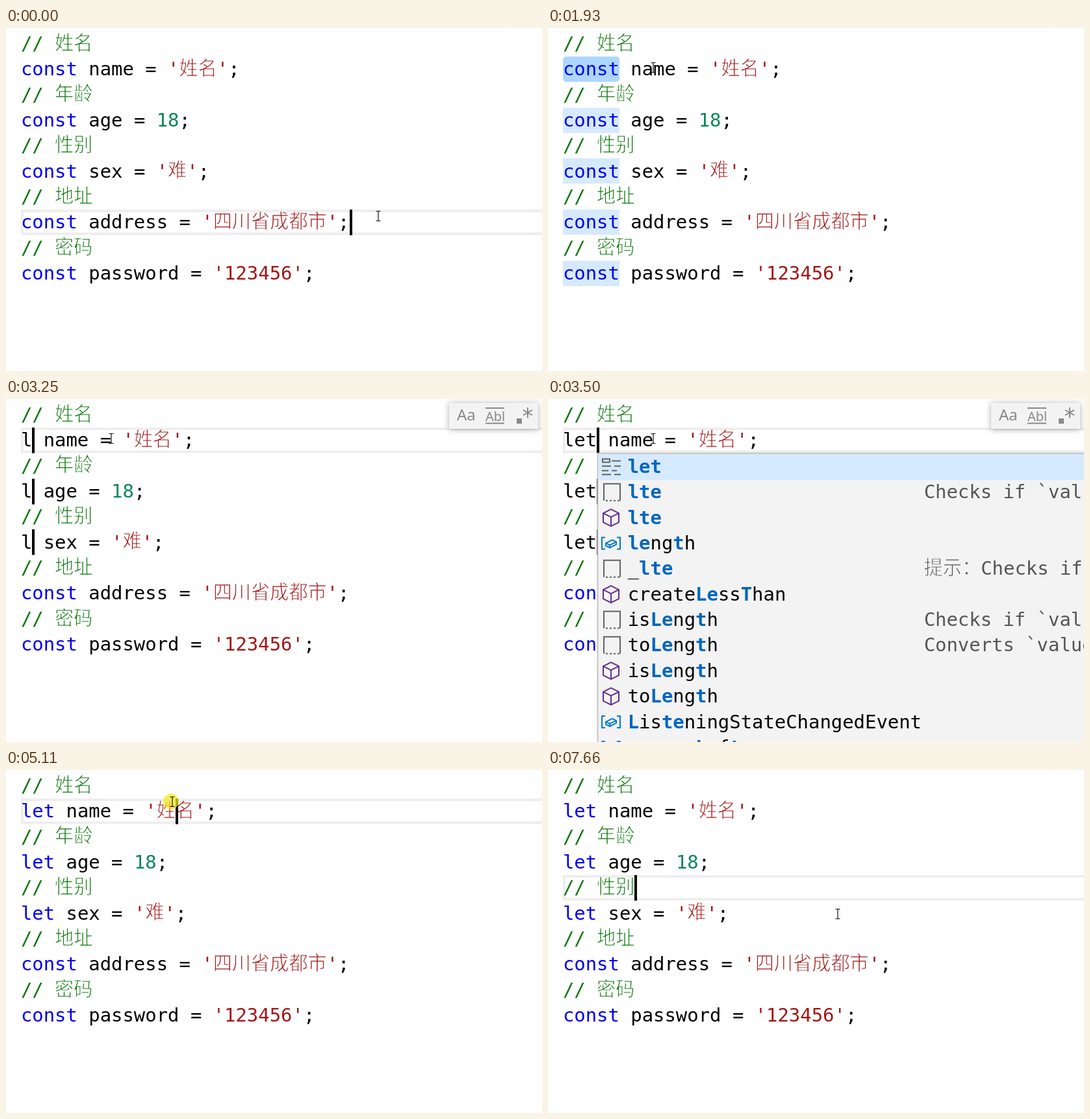
Write an HTML page that moves like this. It is 825 by 529 pixels and loops after 7980 ms.

```html
<!DOCTYPE html>
<html lang="zh-CN">
<head>
<meta charset="utf-8">
<title>Multi-cursor editing</title>
<style>
html, body { margin: 0; width: 100%; height: 100%; overflow: hidden; background: #fff; }
svg { display: block; width: 100vw; height: 100vh; }
text { font: 28.9px "DejaVu Sans Mono", monospace; white-space: pre; }
/* A background-coloured outline thins the Chinese strokes. */
.cjk { font: 200 29.2px "Noto Sans CJK SC", "Noto Sans CJK", sans-serif; stroke: #fff; stroke-width: .9; }
.menu .cjk { stroke: #f3f3f3; }
.hit { font-weight: bold; fill: #0066bf; }
.ui { font: 25px "Noto Sans", "Open Sans", sans-serif; fill: #888; }
.icon { fill: none; stroke-width: 2; }
</style>
</head>
<body>
<svg id="stage" viewBox="0 0 825 529" xmlns="http://www.w3.org/2000/svg">
  <g id="scene"></g>
  <g id="mouse">
    <circle id="halo" cx="-2" cy="-.5" r="12" fill="#f6ec1c" fill-opacity=".72"/>
    <path d="M-3.5-7.5h3l.5 1 .5-1h3M0-7v14M-3.5 7.5h3l.5-1 .5 1h3" fill="none" stroke="#111" stroke-width="1.2"/>
  </g>
</svg>
<script>
const LOOP = 7980;
const LEFT = 22.9, TOP = 4.7, ROW = 39.35, LATIN = 17.4, WIDE = 29.17;
const INK = { comment: '#087608', key: '#0000f0', string: '#a31515', number: '#098658', plain: '#000' };
const $ = id => document.getElementById(id);
const isWide = c => c > '\u2e7f';
const width = s => [...s].reduce((w, c) => w + (isWide(c) ? WIDE : LATIN), 0);
const rowTop = i => Math.round(TOP + ROW * i);
const within = (t, a, b) => t >= a && t < b;
const rect = (x, y, w, h, fill, more = '') =>
  `<rect x="${x}" y="${y}" width="${w}" height="${h}" fill="${fill}" ${more}/>`;

// Latin and Chinese characters have different advances, so each run is placed by itself.
function runs(s, x, y, fill, cls = '') {
  let out = '';
  for (const run of s.match(/[\u2e80-\uffff]+|[^\u2e80-\uffff]+/g) || []) {
    const wide = isWide(run[0]);
    out += `<text x="${x.toFixed(2)}" y="${(wide ? y - 1.3 : y).toFixed(2)}" fill="${fill}" class="${wide ? 'cjk' : cls}">${run}</text>`;
    x += width(run);
  }
  return out;
}

function codeLine(s, row, plainKeys) {
  let x = LEFT, out = '';
  const tokens = s.match(/\/\/.*|'[^']*'|\b\d+\b|\b(?:const|let)\b|\w+|[^\w']+/g);
  for (const tok of tokens) {
    const kind = tok.startsWith('//') ? 'comment'
      : tok[0] === "'" ? 'string'
      : /^\d/.test(tok) ? 'number'
      : /^(const|let)$/.test(tok) && !(plainKeys && tok === 'let') ? 'key' : 'plain';
    out += runs(tok, x, TOP + ROW * row + 29.3, INK[kind]);
    x += width(tok);
  }
  return out;
}

function code(t) {
  const word = t < 3250 ? 'const' : t < 3400 ? 'l' : t < 3500 ? 'le' : 'let';
  return [
    '// 姓名', word + " name = '姓名';",
    '// 年龄', word + ' age = 18;',
    '// 性别', word + " sex = '难';",
    '// 地址', "const address = '四川省成都市';",
    '// 密码', "const password = '123456';"
  ].map((s, i) => codeLine(s, i, t < 3570)).join('');
}

function activeLine(t) {
  if (within(t, 1440, 3250)) return '';
  const row = t < 1300 ? 7 : t < 5740 ? 1 : 4;
  return rect(25, rowTop(row) + 2, 830, ROW - 4, 'none', 'stroke="#eee" stroke-width="4"');
}

function selection(t) {
  if (!within(t, 1440, 3250)) return '';
  const since = [1440, 2090, 2470];
  return [1, 3, 5, 7, 9].map((row, i) => {
    const box = (fill, rx) => rect(23, rowTop(row), 87, 39, fill, `rx="${rx}"`);
    return t >= since[i] ? box('#add6ff', 5) : t >= 1650 ? box('#d6eaff', 0) : '';
  }).join('');
}

// Each entry: from, to, text before the caret, rows.
const CARETS = [
  [0, 440, "const address = '四川省成都市';", [7]],
  [970, 1300, "const address = '四川省成都市';", [7]],
  [1300, 1440, 'co', [1]],
  [1440, 1930, 'const', [1]],
  [2090, 2470, 'const', [1, 3]],
  [2470, 2950, 'const', [1, 3, 5]],
  [3250, 3400, 'l', [1, 3, 5]],
  [3400, 3500, 'le', [1, 3, 5]],
  [3500, 3950, 'let', [1, 3, 5]],
  [4410, 4900, 'let', [1, 3, 5]],
  [5040, 5540, "let name = '姓", [1]],
  [5740, 6200, '// 性别', [4]],
  [6750, 7200, '// 性别', [4]],
  [7660, LOOP, '// 性别', [4]]
];
function carets(t) {
  const hit = CARETS.find(c => within(t, c[0], c[1]));
  if (!hit) return '';
  const x = Math.round(LEFT + width(hit[2]));
  return hit[3].map(row => rect(x, rowTop(row), 4, 39.5, '#000')).join('');
}

const ICONS = {
  key: ['#616161', 'M-13-12h11v5h-11zM1-9h14M-14-1h14M5-1h10M-14 6h10M1 6h8M-14 12h14M5 12h10'],
  snippet: ['#616161', 'M-11 13V-13H14V13M-8 13h3m3 0h3m3 0h3m3 0h3'],
  cube: ['#652d90', 'M0-13L12-7V7L0 13L-12 7V-7ZM-12-7L0-1L12-7M0-1V13'],
  field: ['#007acc', 'M-9-9h-5V9h5M9-9h5V9h-5M-8 0L2-5L8-2V2L-2 7L-8 4ZM-8 0L-2 3L8-2M-2 3V7']
};
// Parts in brackets are the matched letters.
const ITEMS = [
  ['key', '[let]'],
  ['snippet', '[lte]', 'Checks if `value`'],
  ['cube', '[lte]'],
  ['field', '[le]ng[t]h'],
  ['snippet', '_[lte]', '提示：Checks if `value`'],
  ['cube', 'create[Le]ss[T]han'],
  ['snippet', 'is[Le]ng[t]h', 'Checks if `value`'],
  ['snippet', 'to[Le]ng[t]h', 'Converts `value`'],
  ['cube', 'is[Le]ng[t]h'],
  ['cube', 'to[Le]ng[t]h'],
  ['field', '[L]is[te]ningStateChangedEvent'],
  ['field', 'screen[Le]f[t]']
];
function popup() {
  let out = rect(76.5, 83.8, 800, 500, '#f3f3f3', 'stroke="#c4c4c4" stroke-width="2"')
    + rect(77.5, 85, 748, 40, '#d6eaff');
  ITEMS.forEach(([kind, label, detail], i) => {
    const mid = 104.4 + ROW * i, [color, d] = ICONS[kind];
    out += `<path class="icon" stroke="${color}" transform="translate(97 ${mid})" d="${d}"/>`;
    let x = 122.7;
    for (const part of label.match(/\[\w+\]|\w+?(?=\[|$)/g)) {
      const hit = part[0] === '[', s = hit ? part.slice(1, -1) : part;
      out += runs(s, x, mid + 9.6, '#000', hit ? 'hit' : '');
      x += width(s);
    }
    if (detail) out += runs(detail, 578.7, mid + 9.6, '#555');
  });
  return `<g class="menu">${out}</g>`;
}

function findOptions() {
  return rect(682, 6, 137, 40, '#f3f3f3', 'style="filter:drop-shadow(0 1px 5px #0005)"')
    + '<text class="ui" x="694" y="33" style="font-size:24px">Aa</text>'
    + '<text class="ui" x="738" y="34" style="font-size:20px">Abl</text>'
    + '<path d="M738 14h29M738 37.5h29M803 13v16M796 17l14 8M796 25l14-8" stroke="#888" stroke-width="2"/>'
    + rect(786, 30, 8, 8, '#888');
}

// Pointer stops: time, x, y.
const PATH = [
  [0, 573, 290], [540, 573, 290], [800, 330, 130], [1000, 110, 14], [1160, 60, 58],
  [1650, 60, 58], [1790, 162, 61], [4400, 162, 61], [4980, 256, 49], [5180, 256, 49],
  [5350, 240, 50], [5580, 366, 180], [6690, 366, 180], [6970, 446, 222], [LOOP, 446, 222]
];
function pointer(t) {
  const i = PATH.findIndex(p => p[0] > t);
  const [t0, x0, y0] = PATH[i - 1], [t1, x1, y1] = PATH[i];
  const k = (t - t0) / (t1 - t0);
  return [x0 + (x1 - x0) * k, y0 + (y1 - y0) * k];
}

let shown = '';
function draw(t) {
  const html = rect(0, 5, 775, 1, '#f8f8f8')
    + activeLine(t) + selection(t) + code(t) + carets(t)
    + (within(t, 3500, 5040) ? popup() : '')
    + (within(t, 2090, 4480) ? findOptions() : '');
  if (html !== shown) $('scene').innerHTML = shown = html;

  const [x, y] = pointer(t);
  $('mouse').setAttribute('transform', `translate(${x.toFixed(1)} ${y.toFixed(1)})`);
  const pressed = within(t, 1300, 1930) || within(t, 5040, 5180) || within(t, 5740, 5830);
  $('halo').setAttribute('visibility', pressed ? 'visible' : 'hidden');
}

const start = performance.now();
function tick() {
  draw((performance.now() - start) % LOOP);
  requestAnimationFrame(tick);
}
tick();
</script>
</body>
</html>
```
